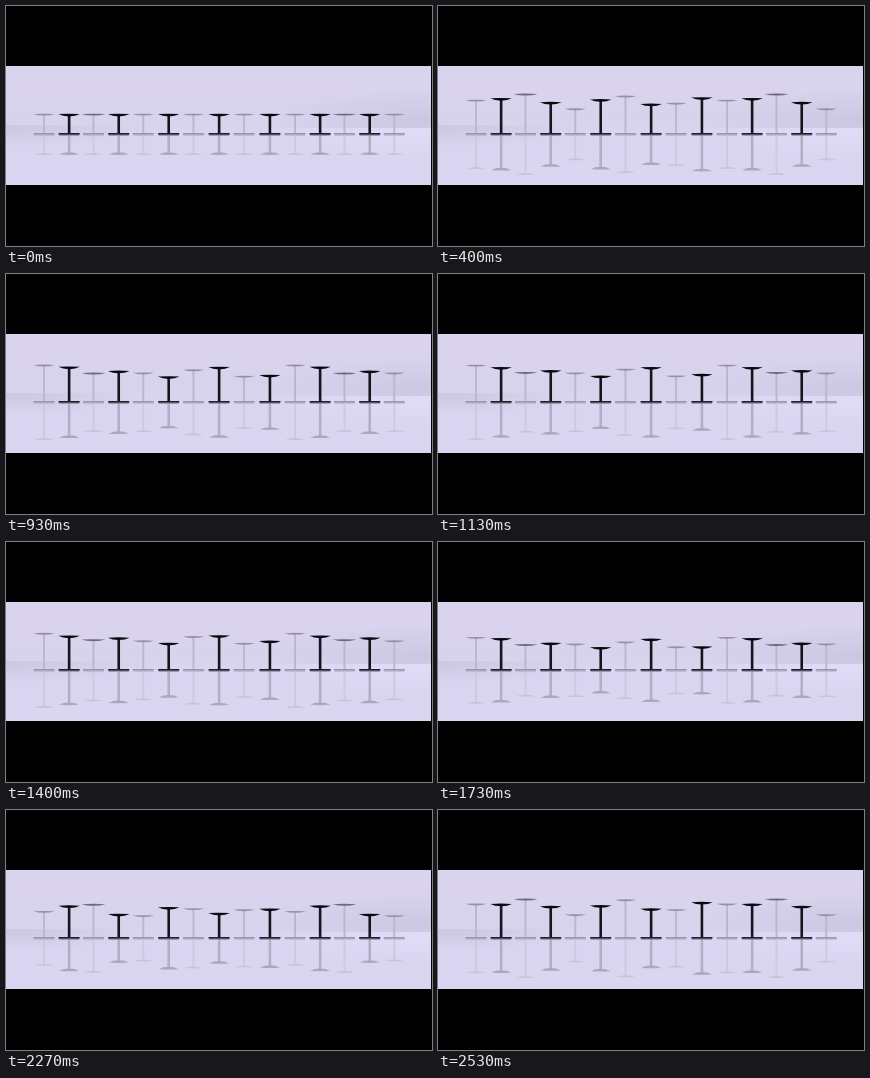
An HTML page with a canvas for the animation above (2.59 s loop, 426 px wide and 240 px high).

```html
<!DOCTYPE html>
<html lang="en">
<head>
<meta charset="utf-8">
<title>Moving tables</title>
<style>
  html, body { margin: 0; width: 100%; height: 100%; overflow: hidden; background: #000; }
  canvas { display: block; width: 426px; height: 240px; }
</style>
</head>
<body>
<canvas id="stage" width="426" height="240"></canvas>
<script>
const ctx = document.getElementById('stage').getContext('2d');
const LOOP = 2590, RATE = 15, LAST = 38, FLOOR = 128, COUNT = 15, GROUP = 10;

// Key points: step, mean height, wave strength, ripple phase in turns.
const keys = [
  [0, 19.3, 0, -0.33],
  [6, 33, 1, -0.33],
  [14, 30, 0.95, 0.04],
  [21, 30.7, 0.8, 0],
  [26, 26.5, 0.85, 0.06],
  [30, 23, 0.6, 0.4],
  [38, 32, 1.1, 0.71]
];

function pose(step) {
  const k = Math.max(1, keys.findIndex(key => key[0] >= step));
  const a = keys[k - 1], b = keys[k], u = (step - a[0]) / (b[0] - a[0]);
  return a.map((v, n) => v + (b[n] - v) * u);
}

const wave = turns => Math.cos(2 * Math.PI * turns);

// Two standing waves and one travelling ripple, repeating every ten tables.
function topAt([, level, swell, phase], i) {
  const u = i / GROUP;
  const shape = 1.9 * wave(u - 0.04) + 3.2 * wave(2 * u - 0.22) + 4.4 * wave(3 * u - phase);
  return FLOOR - Math.max(18, level + swell * shape);
}

function centre(i) {
  const bend = 1.2 * Math.sin(Math.PI * (i % GROUP) / GROUP);
  return 38 + 25.1 * i - bend + (i % 2) * 0.4;
}

function fillRect(x, y, w, h, style) {
  ctx.fillStyle = style;
  ctx.fillRect(x, y, w, h);
}

function gradient(g, ...stops) {
  stops.forEach(([at, color]) => g.addColorStop(at, color));
  return g;
}

function glow(x, y, rx, ry, rgb, alpha, y0, h) {
  ctx.save();
  ctx.beginPath();
  ctx.rect(0, y0, 425, h);
  ctx.clip();
  ctx.translate(x, y);
  ctx.scale(rx, ry);
  fillRect(-1, -1, 2, 2, gradient(ctx.createRadialGradient(0, 0, 0, 0, 0, 1),
    [0, `rgba(${rgb},${alpha})`], [1, `rgba(${rgb},0)`]));
  ctx.restore();
}

function room() {
  fillRect(0, 0, 426, 240, '#000');
  fillRect(0, 60, 425, 119, gradient(ctx.createLinearGradient(0, 60, 0, 179),
    [0, '#dad3ee'], [0.45, '#d8d3ec'], [0.55, '#d9d5f0'], [1, '#dad6f2']));
  glow(0, 121, 140, 20, '188,184,210', 0.45, 119, 30);
  glow(425, 116, 160, 34, '186,184,214', 0.45, 60, 62);
  glow(425, 126, 180, 26, '228,225,252', 0.6, 122, 40);
}

function plate(x, y, half, dir, depth, color) {
  ctx.fillStyle = color;
  ctx.beginPath();
  ctx.moveTo(x - half, y - 0.7 * dir);
  ctx.quadraticCurveTo(x, y - 1.4 * dir, x + half, y - 0.7 * dir);
  ctx.quadraticCurveTo(x + half * 0.6, y + depth * dir, x, y + depth * dir);
  ctx.quadraticCurveTo(x - half * 0.6, y + depth * dir, x - half, y - 0.7 * dir);
  ctx.fill();
}

function table(i, top) {
  const x = centre(i), dark = i % 2 === 1, bold = i % GROUP === 2;
  const leg = dark ? 2.6 : 2, depth = dark ? 1.7 : 0.9;
  const mirror = 2 * FLOOR + 0.6 - top;

  fillRect(x - leg / 2, FLOOR + 1, leg, mirror - FLOOR - 1, dark ? '#b5adc6' : '#cec9e2');
  plate(x, mirror, 10, -1, depth, dark ? '#aea6bd' : '#c8c3da');

  fillRect(x - leg / 2, top, leg, FLOOR - top, dark ? '#17141d' : '#bdb6d0');
  plate(x, top, bold ? 12 : 10.8, 1, depth, dark ? '#0b0910' : bold ? '#6f6979' : '#9690a6');

  fillRect(x - 10.5, FLOOR - 1, 21, 1.8, dark ? '#221d2b' : '#9d95ae');
  fillRect(x - 10, FLOOR + 0.8, 20, 1, dark ? '#968da7' : '#c1b9d2');
}

function draw(time) {
  const now = pose(Math.min(LAST, Math.floor((time % LOOP + 4) * RATE / 1000)));
  room();
  for (const first of [0, 1]) {
    for (let i = first; i < COUNT; i += 2) table(i, topAt(now, i));
  }
}

const start = performance.now();
function tick() {
  draw(performance.now() - start);
  requestAnimationFrame(tick);
}
tick();
</script>
</body>
</html>
```
